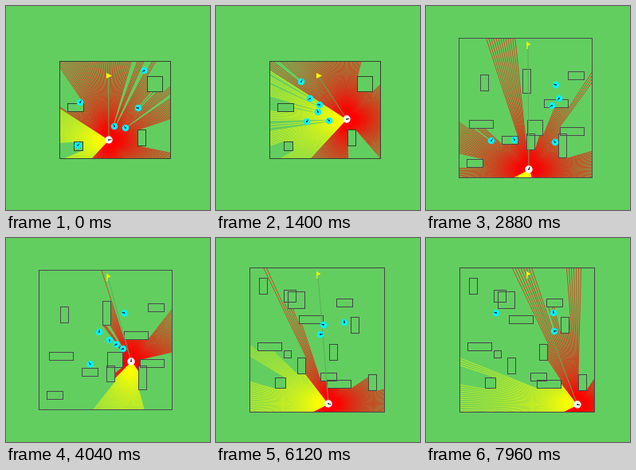
Recreate the animation shown at these times as an HTML page with a canvas. Size 256 px wide and 256 px high, loop 8000 ms.

```html
<!DOCTYPE html>
<html>
<head>
<meta charset="utf-8">
<style>
html, body { margin: 0; width: 100%; height: 100%; overflow: hidden; background: #62ce60; }
canvas { display: block; width: 100vw; height: 100vh; }
</style>
</head>
<body>
<canvas id="stage" width="256" height="256"></canvas>
<script>
const ctx = document.getElementById('stage').getContext('2d');
const LOOP = 8000, STEP = 40, RAYS = 360, REAR = 40;
const RAD = Math.PI / 180, INK = '#102028';

// Obstacles come in a few standard sizes, placed by their top left corner.
const blocks = (w, h) => (...spots) => spots.map(([x, y]) => [x, y, x + w, y + h]);
const tall = blocks(10, 20), post = blocks(10, 30);
const wide = blocks(20, 10), beam = blocks(30, 10);
const square = (x, y, size) => [x, y, x + size, y + size];

// Paths pass through their points at the scene's times; heading takes progress 0..1.
const scenes = [
  {
    start: 0, end: 2560, times: [0, 1400],
    line: '#34432f', goal: [128.5, 88], fullFlag: true,
    room: [67, 69, 206, 191],
    boxes: [
      square(177, 88, 19), square(85, 170, 11),
      ...wide([77, 122]), ...tall([165, 155])
    ],
    heading: () => -7,
    robot: [[129, 168], [164, 142]],
    walkers: [
      [[173.5, 81], [118, 116]], [[93, 121], [107, 95]], [[166, 128], [130, 124]],
      [[136, 151], [128, 133]], [[150, 153], [142, 144]], [[90, 175], [114, 145]]
    ]
  },
  {
    start: 2560, end: 5080, times: [2880, 4040, 4800],
    line: '#4c4a50', goal: [128, 50],
    room: [41, 40, 208, 215],
    boxes: [
      square(127, 143, 19),
      ...tall([68, 86], [126, 160]), ...post([121, 79], [166, 160]),
      ...wide([178, 82], [95, 163], [51, 192]),
      ...beam([148, 117], [54, 143], [168, 152])
    ],
    heading: p => -78 - 10 * Math.cos(8.2 * (p - 0.508)),
    robot: [[129, 205], [157, 155], [181, 134]],
    walkers: [
      [[163, 99], [139, 91]], [[158, 125], [126, 139]], [[111, 168], [102, 152]],
      [[167, 116], [147, 139], [117, 151]],
      [[162, 171], [130, 128], [130, 130]],
      [[82, 169], [117, 118], [117, 96]]
    ]
  },
  {
    start: 5080, end: 8000, times: [6120, 7960],
    line: '#46464a', goal: [128, 47],
    room: [42, 37, 211, 218],
    boxes: [
      square(85, 65, 15), square(90, 67, 21), square(85, 141, 9), square(74, 175, 13),
      ...tall([54, 50], [169, 99], [142, 133], [102, 150], [191, 171]),
      ...wide([151, 76], [131, 169]),
      ...beam([104, 97], [52, 131], [139, 178])
    ],
    heading: () => 12.5,
    robot: [[141, 208], [190, 209]],
    walkers: [[[135, 109], [88, 94]], [[161, 106], [160, 94]], [[131, 121], [161, 117]]]
  }
];

const clamp = (v, lo, hi) => Math.min(Math.max(v, lo), hi);

// Linear motion through the points, carried on past both ends but kept in the room.
function along(path, { times, room: [l, t, r, b] }, now) {
  const keys = path.length < times.length ? [times[0], times.at(-1)] : times;
  let i = 0;
  while (i < path.length - 2 && now >= keys[i + 1]) i++;
  const k = (now - keys[i]) / (keys[i + 1] - keys[i]);
  const [x, y] = path[i].map((v, j) => v + (path[i + 1][j] - v) * k);
  return [clamp(x, l + 5, r - 5), clamp(y, t + 5, b - 5)];
}

function walkerPose(path, scene, now) {
  const [x, y] = along(path, scene, now);
  const [nx, ny] = along(path, scene, now + 1);
  const dir = Math.atan2(ny - y, nx - x);
  const legs = [-1.8, 1.8].map(s => [x - Math.sin(dir) * s, y + Math.cos(dir) * s]);
  return { x, y, dir, legs };
}

// Entry and exit distance of a ray through a rectangle.
function span(x, y, dx, dy, [l, t, r, b]) {
  const x1 = (l + 0.5 - x) / dx, x2 = (r + 0.5 - x) / dx;
  const y1 = (t + 0.5 - y) / dy, y2 = (b + 0.5 - y) / dy;
  return [
    Math.max(Math.min(x1, x2), Math.min(y1, y2)),
    Math.min(Math.max(x1, x2), Math.max(y1, y2))
  ];
}

function castRay(x, y, angle, scene, legs) {
  const dx = Math.cos(angle), dy = Math.sin(angle);
  let dist = span(x, y, dx, dy, scene.room)[1];
  for (const box of scene.boxes) {
    const [near, far] = span(x, y, dx, dy, box);
    if (near > 0 && near < far) dist = Math.min(dist, near);
  }
  for (const [lx, ly] of legs) {
    const ahead = (lx - x) * dx + (ly - y) * dy;
    const off = Math.abs((lx - x) * dy - (ly - y) * dx);
    if (ahead > 0 && off < 0.4) dist = Math.min(dist, ahead);
  }
  return [x + dx * dist, y + dy * dist];
}

function line(x1, y1, x2, y2, color, width) {
  ctx.strokeStyle = color;
  ctx.lineWidth = width;
  ctx.beginPath();
  ctx.moveTo(x1, y1);
  ctx.lineTo(x2, y2);
  ctx.stroke();
}

// Separate translucent strokes build up to solid colour near the robot.
function drawRays(scene, x, y, heading, legs) {
  for (let i = 0; i < RAYS; i++) {
    const deg = (i + 0.01) * 360 / RAYS;
    const color = Math.abs(deg - 180) <= REAR ? '#ff0' : '#f00';
    ctx.globalAlpha = 0.62;
    line(x, y, ...castRay(x, y, (heading + deg) * RAD, scene, legs), color, 1);
  }
  ctx.globalAlpha = 1;
}

function frameRect([l, t, r, b]) {
  ctx.strokeRect(l + 0.5, t + 0.5, r - l, b - t);
}

function disc(x, y, r, color) {
  ctx.fillStyle = color;
  ctx.beginPath();
  ctx.arc(x, y, r, 0, 2 * Math.PI);
  ctx.fill();
}

function body(x, y, r, dir, color) {
  disc(x, y, r, color);
  line(x, y, x + Math.cos(dir) * r * 0.7, y + Math.sin(dir) * r * 0.7, INK, 1);
  disc(x, y, 0.9, INK);
}

function drawFlag(x, y, full) {
  const [left, top, right, bottom] = full ? [-2.5, -4, 4.5, 3] : [-1.5, -4.5, 3.5, 0.5];
  ctx.fillStyle = '#ff0';
  ctx.beginPath();
  ctx.moveTo(x + left, y + top);
  ctx.lineTo(x + right, y + (top + bottom) / 2);
  ctx.lineTo(x + left, y + bottom);
  ctx.fill();
  if (!full) line(x - 1, y - 5, x - 1, y + 4, '#ff0', 1.2);
}

function draw(now) {
  const scene = scenes.find(s => now < s.end);
  const progress = (now - scene.start) / (scene.end - scene.start);
  const heading = scene.heading(progress);
  const [x, y] = along(scene.robot, scene, now);
  const walkers = scene.walkers.map(path => walkerPose(path, scene, now));

  ctx.fillStyle = '#62ce60';
  ctx.fillRect(0, 0, 256, 256);
  drawRays(scene, x, y, heading, walkers.flatMap(w => w.legs));

  ctx.strokeStyle = scene.line;
  ctx.lineWidth = 1;
  frameRect(scene.room);
  scene.boxes.forEach(frameRect);

  line(x, y, ...scene.goal, 'rgb(92,176,86)', 1);
  drawFlag(...scene.goal, scene.fullFlag);
  for (const w of walkers) body(w.x, w.y, 4.3, w.dir, '#00f4ff');
  body(x, y, 4.7, heading * RAD, '#fff');
}

const begin = performance.now();
function tick() {
  const t = (performance.now() - begin) % LOOP;
  draw(Math.floor(t / STEP) * STEP);
  requestAnimationFrame(tick);
}
tick();
</script>
</body>
</html>
```
